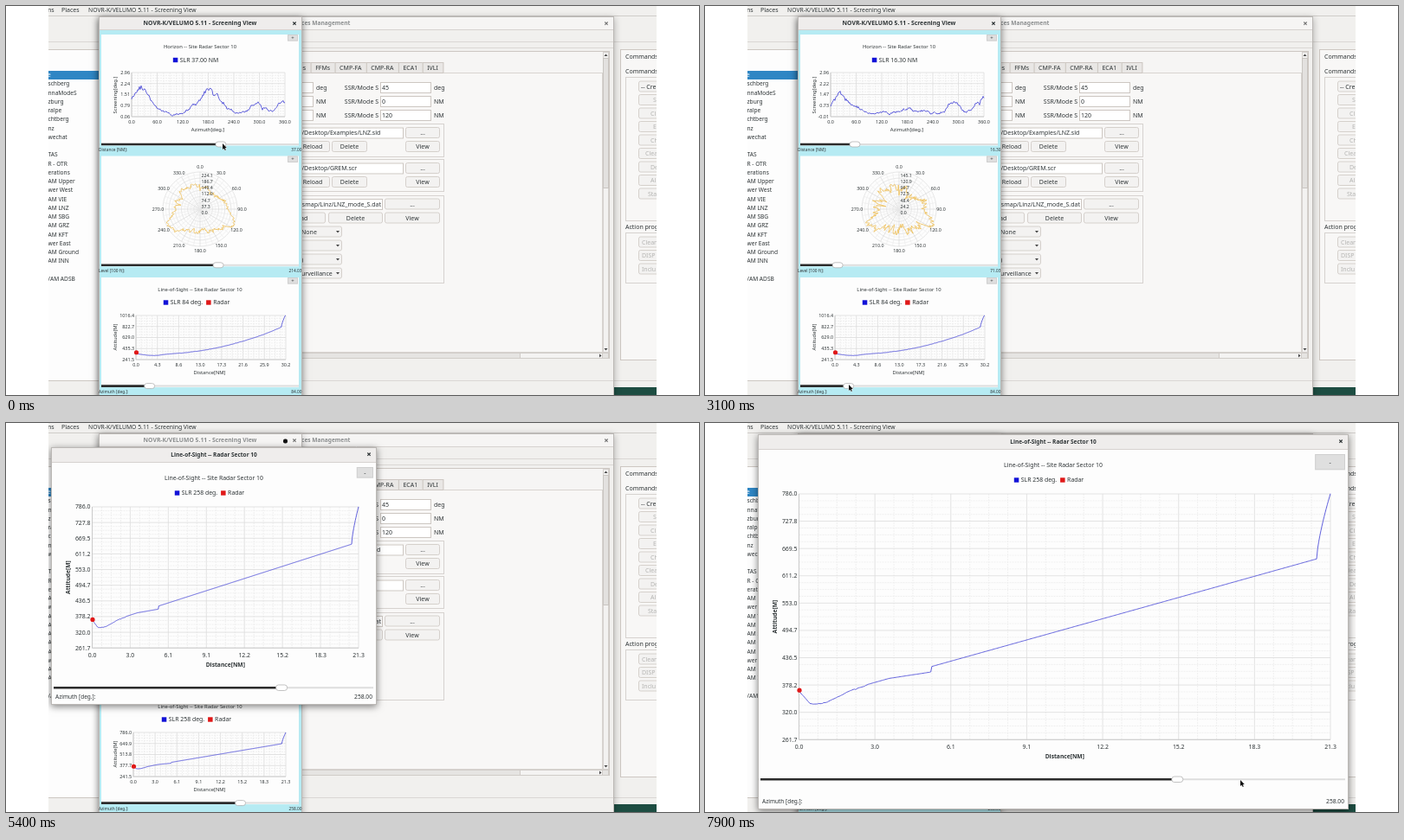
An HTML page with a canvas that plays this animation: 800x450 px, repeating every 8000 ms.

```html
<!DOCTYPE html>
<html lang="en">
<head>
<meta charset="utf-8">
<title>Screening View</title>
<style>
html, body { margin: 0; width: 100%; height: 100%; overflow: hidden; background: #fff; }
canvas { display: block; }
</style>
</head>
<body>
<canvas id="stage" width="800" height="450"></canvas>
<script>
const c = document.getElementById('stage').getContext('2d');
const LOOP = 8000, APP = 'NOVR-K/VELUMO 5.11 - Screening View';
const BLUE = '#1212d8', RED = '#e01818', CURVE = '#5050d8';
const INK = '#2e3436', FADED = '#8b8e8f', GREY = '#b4b4b2', EDGE = '#cdc7c2';
const FONT = '"Noto Sans", "Open Sans", sans-serif';

const lerp = (a, b, k) => a + (b - a) * k;
const ramp = (v, a, b) => Math.max(0, Math.min(1, (v - a) / (b - a)));
const bump = (v, mid, width) => Math.exp(-(((v - mid) / width) ** 2));
const range = (n, f) => Array.from({ length: n }, (_, i) => f(i));

// Seeded noise in -1..1, and a rugged mix of two octaves of it
const noise = i => { const v = Math.sin(i * 127.1 + 3.7) * 43758.5453; return (v - Math.floor(v)) * 2 - 1; };
const rough = p => {
  const q = p / 4, i = Math.floor(q);
  return .65 * lerp(noise(i), noise(i + 1), q - i) + .35 * noise(Math.floor(p));
};

// Skyline height in pixels above the axis, for the far and the near range
const far = u => 2 + 28 * bump(u, .06, .1) + 27 * bump(u, .51, .11) + 14 * bump(u, .81, .06) + 14 * bump(u, 1, .09);
const near = u => 4 + 20 * bump(u, .05, .05) + 10 * bump(u, .11, .08) + 4 * bump(u, .52, .09)
  + 13 * bump(u, .8, .05) + 16 * bump(u, 1, .08);
const coverage = deg => 25 + 15 * bump(deg, 112, 28) + 15 * bump(deg, 240, 26) + 4 * bump(deg, 325, 40);

// Terrain altitude along the two bearings, u = 0..1
const east = u => 330 + 520 * u ** 2.4 + 18 * ramp(u, .05, 0) - 22 * bump(u, .13, .07)
  + 6 * rough(u * 70) + 166 * ramp(u, .97, .995) ** .7;
const west = u => 338.5 + 317 * u + 28 * ramp(u, .021, 0) - 14 * bump(u, .05, .035)
  - (u < .25 ? 11 * ramp(u, .17, .246) : 0) + 131 * ramp(u, .974, 1) ** .7
  + (u > .02 && u < .13 ? 2.5 * rough(u * 200) : 0);

function box(x0, y0, x1, y1, fill, stroke) {
  if (fill) { c.fillStyle = fill; c.fillRect(x0, y0, x1 - x0, y1 - y0); }
  if (stroke) {
    c.strokeStyle = stroke; c.lineWidth = 1;
    c.strokeRect(x0 + .5, y0 + .5, x1 - x0 - 1, y1 - y0 - 1);
  }
}
function text(s, x, y, size = 7, align = 'left', color = INK, weight = 400) {
  c.font = `${weight} ${size}px ${FONT}`;
  c.textAlign = align; c.fillStyle = color;
  c.fillText(s, x, y + size * .36);
}
function measure(s, size = 7) {
  c.font = `400 ${size}px ${FONT}`;
  return c.measureText(s).width;
}
function line(points, color, width = 1, dash = []) {
  c.beginPath();
  points.forEach(p => c.lineTo(...p));
  c.strokeStyle = color; c.lineWidth = width; c.setLineDash(dash);
  c.stroke(); c.setLineDash([]);
}
const rule = (x0, x1, y, color = '#dad7d4') => line([[x0, y + .5], [x1, y + .5]], color);
function upright(s, x, y, size, weight) {
  c.save(); c.translate(x, y); c.rotate(-Math.PI / 2);
  text(s, 0, 0, size, 'center', INK, weight);
  c.restore();
}
function button(x0, x1, y, label = '', color = INK) {
  c.beginPath(); c.roundRect(x0 + .5, y - 6, x1 - x0 - 1, 12, 2);
  c.fillStyle = '#f3f2f1'; c.fill();
  c.strokeStyle = EDGE; c.lineWidth = .8; c.stroke();
  text(label, (x0 + x1) / 2, y, 7, 'center', color);
}
function field(x0, x1, y, label = '') {
  box(x0, y - 6, x1, y + 7, '#fff', EDGE);
  text(label, x0 + 2, y);
}
function triangle(x, y, angle = 0) {
  c.save(); c.translate(x, y); c.rotate(angle);
  c.fillStyle = '#444'; c.beginPath();
  c.moveTo(-2, -1); c.lineTo(2, -1); c.lineTo(0, 1.5); c.fill();
  c.restore();
}
// Window with shadow, title bar and close mark
function frame(x, y, w, h, fill, active, barHeight = 16) {
  c.save();
  c.shadowColor = active ? 'rgba(0,0,0,.5)' : 'rgba(0,0,0,.3)'; c.shadowBlur = 8; c.shadowOffsetY = 2;
  box(x, y, x + w, y + h, fill);
  c.restore();
  box(x, y, x + w, y + barHeight, active ? '#efedec' : '#f6f5f4');
  rule(x, x + w, y + barHeight - 1, '#d6d2cf');
  box(x, y, x + w, y + h, null, '#bbb8b5');
  const cx = x + w - 9, cy = y + 8.2, color = active ? INK : '#777';
  line([[cx - 1.7, cy - 1.7], [cx + 1.7, cy + 1.7]], color, 1.1);
  line([[cx + 1.7, cy - 1.7], [cx - 1.7, cy + 1.7]], color, 1.1);
}
function slider(x0, x1, x, y, knob = 6) {
  line([[x, y], [x1, y]], '#dedede', 2);
  line([[x0, y], [x, y]], '#2b2b2b', 2.6);
  c.beginPath(); c.roundRect(x - knob, y - knob * .5, knob * 2, knob, 3);
  c.fillStyle = '#fff'; c.fill();
  c.strokeStyle = '#aaa'; c.lineWidth = .7; c.stroke();
}
function legend(cx, y, items) {
  const widths = items.map(i => measure(i[1], 6.9) + 8);
  let x = cx - (widths.reduce((a, b) => a + b) + 4 * (items.length - 1)) / 2;
  items.forEach(([color, label], i) => {
    box(x, y - 2.7, x + 5.5, y + 2.7, color);
    text(label, x + 8, y, 6.9);
    x += widths[i] + 4;
  });
}
// Grid with tick labels and four subdivisions per tick
function axes(x0, y0, x1, y1, xs, ys, size) {
  const grid = (labels, draw) => range(labels.length * 4 - 3, i => {
    const major = i % 4 == 0;
    draw(i / (labels.length * 4 - 4), [major ? '#dcdcdc' : '#ececec', .8, major ? [] : [2, 1]], major && labels[i / 4]);
  });
  grid(xs, (k, style, label) => {
    const x = lerp(x0, x1, k);
    line([[x, y0], [x, y1]], ...style);
    if (label) text(label, x, y1 + size + 1, size, 'center');
  });
  grid(ys, (k, style, label) => {
    const y = lerp(y0, y1, k);
    line([[x0, y], [x1, y]], ...style);
    if (label) text(label, x0 - 2, y, size, 'right');
  });
  line([[x0, y0], [x0, y1], [x1, y1]], '#c4c4c4', .8);
}
const ticks = (a, b, n, digits) => range(n + 1, i => lerp(a, b, i / n).toFixed(digits));

function siteList() {
  rule(49, 107, 41);
  box(49, 50, 107, 433, '#fdfdfd');
  rule(49, 107, 50, EDGE); rule(49, 107, 433, EDGE);
  box(49, 75, 107, 85, '#2f86c4');
  text('e', 48, 80, 6.6, 'left', '#fff');
  ['schberg', 'nnaModeS', 'zburg', 'ralpe', 'chtberg', 'nz', 'wechat', '', 'TAS', 'R - OTR', 'erations',
   'AM Upper', 'wer West', 'AM VIE', 'AM LNZ', 'AM SBG', 'AM GRZ', 'AM KFT', 'wer East', 'AM Ground', 'AM INN',
   '', '/AM ADSB']
    .forEach((s, i) => text(s, 48.5, 90 + i * 10.25, 6.6));
}

function commands() {
  rule(702, 751, 41);
  box(709, 50, 752, 410, '#f8f7f6', EDGE);
  text('Commands', 715, 58); text('Commands', 715, 75); text('Action prog', 715, 255);
  box(715, 82, 760, 249, null, '#d6d2cf');
  box(715, 262, 760, 321, null, '#d6d2cf');
  button(730, 765, 93); text('-- Cre', 733, 93);
  const clipped = (s, x, y) => { button(730, 775, y); text(s, x, y, 7, 'left', GREY); };
  ['S', 'Cl', 'E', 'Ch', 'Clea', 'De', 'Al', 'Sta'].forEach((s, i) => clipped(s, 750 - 3 * s.length, 108.5 + i * 15.5));
  ['Clean', 'DISP', 'Inclu'].forEach((s, i) => clipped(s, 734, 273 + i * 15.5));
  rule(702, 751, 433);
  box(702, 441, 751, 450, '#1d4d42');
}

function management() {
  frame(107, 12, 595, 460, '#f1f0ee', false);
  text('ces Management', 341, 20, 6.6, 'left', FADED, 700);
  rule(107, 701, 41); rule(107, 701, 48);
  box(330, 52, 697, 408, '#f6f5f4', EDGE);
  box(330, 77, 689, 401, '#f8f7f6', '#d8d4d0');
  let tab = 330;
  ['ses', 'FFMs', 'CMP-FA', 'CMP-RA', 'ECA1', 'IVLI'].forEach(s => {
    const w = measure(s) + 11;
    box(tab, 65, tab + w + 1, 78, '#e9e7e5', EDGE);
    text(s, tab + w / 2, 71.5, 7, 'center');
    tab += w;
  });
  [['deg', '45'], ['NM', '0'], ['NM', '120']].forEach(([unit, value], i) => {
    const y = 94 + i * 16;
    field(320, 355, y); text(unit, 358, y);
    text('SSR/Mode S', 430, y, 7, 'right');
    field(432, 491, y, value); text(unit, 494, y);
  });
  [[136, 175], [177, 215], [219, 321]].forEach(([a, b]) => box(330, a, 506, b, null, '#d6d2cf'));
  ['/Desktop/Examples/LNZ.sld', '/Desktop/GREM.scr'].forEach((path, i) => {
    const y = 146.5 + i * 41;
    field(320, 459, y); text(path, 341.5, y);
    button(461, 501, y, '...');
    button(334, 374, y + 16, 'Reload'); button(376, 417, y + 16, 'Delete'); button(461, 501, y + 16, 'View');
  });
  field(320, 435, 229); text('nsmap/Linz/LNZ_mode_S.dat', 433, 229, 7, 'right');
  button(437, 501, 229, '...');
  button(310, 369, 245); text('ad', 340, 245);
  button(372, 435, 245, 'Delete'); button(437, 501, 245, 'View');
  ['None', '', ')', 'urveillance'].forEach((s, i) => {
    const y = 261 + i * 16;
    button(320, 388, y); text(s, 341, y); triangle(383, y);
  });

  // Scroll bars
  box(689, 53, 696, 401, '#f3f2f1', '#d5d1ce');
  box(689, 60, 696, 211, '#e3e1df', '#c9c5c1');
  triangle(692.5, 57, Math.PI); triangle(692.5, 397);
  box(330, 401, 696, 408, '#e6e4e2', '#d0ccc8');
  box(593, 401, 689, 408, '#f4f3f2', '#d0ccc8');
  triangle(686, 404.5, -Math.PI / 2);
  rule(330, 701, 433);
}

function desktop() {
  box(49, 0, 751, 450, '#f1f0ee');
  text('ns', 48, 4.5); text('Places', 64, 4.5); text(APP, 95, 4.5, 6.8);
  rule(49, 751, 11, '#cfccc9');
  siteList();
  commands();
  management();
}

function horizon(distance) {
  const k = (37 - distance) / 20.7;
  text('Horizon -- Site Radar Sector 10', 224, 46.5, 5.9, 'center');
  legend(219, 62.5, [[BLUE, `SLR ${distance.toFixed(2)} NM`]]);
  axes(145, 77, 322, 128, ticks(0, 360, 6, 1), ticks(2.961, lerp(.06, -.014, k), 4, 2), 5.4);
  text('Azimuth[deg.]', 233, 143, 5.8, 'center');
  upright('Screening[deg.]', 126, 103, 5.8);
  line(range(178, i => {
    const h = lerp(far(i / 177), near(i / 177), k);
    return [145 + i, 128 - Math.max(.5, h + rough(i + Math.round(distance)) * (2 + h * .15))];
  }), CURVE, .9);
}

function polar(level) {
  const cx = 224, cy = 235, R = 43, low = ramp(level, 214, 71);
  const ray = (deg, r) => [cx + r * Math.sin(deg * Math.PI / 180), cy - r * Math.cos(deg * Math.PI / 180)];
  for (let i = 1; i <= 12; i++) line(range(73, j => ray(j * 5, R * i / 12)), i % 2 ? '#eeeeee' : '#dddddd', .7);
  for (let d = 0; d < 360; d += 10) line([[cx, cy], ray(d, R)], d % 30 ? '#ececec' : '#dadada', .7);
  for (let d = 0; d < 360; d += 30) {
    const [x, y] = ray(d, 48.5);
    text(d.toFixed(1), x, y, 5.3, 'center');
  }
  line(range(241, i => {
    const deg = i % 240 * 1.5;
    return ray(deg, coverage(deg) * (1 - .08 * low) + rough(i % 240) * (5 + 5 * low));
  }), '#f0c565', .9);
  const top = 224.06 - 79 * low ** 1.16;
  for (let i = 0; i <= 6; i++) text((top * i / 6).toFixed(1), 225.5, 239 - i * 7.15, 5.2);
}

function radarDot(x, y) {
  c.beginPath(); c.arc(x, y, 2.6, 0, 7); c.fillStyle = RED; c.fill();
}
function profile(azimuth) {
  const k = (azimuth - 84) / 174, low = 241.54, high = lerp(1016.4, 786.02, k), x0 = lerp(150, 147, k);
  text('Line-of-Sight -- Site Radar Sector 10', 224, 327.5, 5.9, 'center');
  legend(220, 343, [[BLUE, `SLR ${Math.round(azimuth)} deg.`], [RED, 'Radar']]);
  axes(x0, 358, 323, 409, ticks(0, lerp(30.24, 21.3, k), 7, 1), ticks(high, low, 4, 1), 5.4);
  text('Distance[NM]', 235, 424, 5.8, 'center');
  upright('Attitude[M]', 126, 383, 5.8);
  const y = v => lerp(409, 358, (v - low) / (high - low));
  line(range(301, i => {
    const u = i / 300, hills = 100 * Math.sin(k * Math.PI) * u * (1 - u) * rough(i / 3 + Math.round(azimuth));
    return [lerp(x0, 323, u), y(lerp(east(u), west(u), k) + hills)];
  }), CURVE, .9);
  radarDot(x0 + .5, y(367));
}

function screening(distance, level, azimuth, active) {
  frame(107, 12, 235, 460, '#b6ebf3', active);
  text(APP, 224, 20, 6.8, 'center', active ? INK : FADED, 700);
  [['Distance [NM]:', distance, 114 + distance * 3.62],
   ['Level [100 ft]:', level, 107.4 + level * .643],
   ['Azimuth [deg.]:', azimuth, 115 + azimuth * .603]].forEach(([label, value, x], i) => {
    const top = 33 + i * 140.5, y = 160 + i * 139.8;
    box(110, top, 338, y + 1.5, '#fdfdfd');
    box(325, top, 337, top + 7.5, '#dfdfdf', '#cfcfcf');
    text('+', 331, top + 3.5, 6, 'center');
    slider(110, 338, x, y);
    text(label, 107, y + 6.7, 4.8); text(value.toFixed(2), 341.5, y + 6.7, 4.8, 'right');
  });
  horizon(distance); polar(level); profile(azimuth);
}

function popup(x, y, w, h, layoutW, layoutH) {
  const extra = (h - 300) * .11;
  frame(x, y, w, h, '#fdfdfd', true, 18);
  text('Line-of-Sight -- Radar Sector 10', x + w / 2, y + 8.5, 6.5, 'center', INK, 700);
  const bw = w * .051, bh = h * .042, right = x + w - 4;
  box(right - bw, y + 23, right, y + 23 + bh, '#dfdfdf', '#d0d0d0');
  text('-', right - bw / 2, y + 23 + bh / 2, 7, 'center');

  // The chart keeps its last layout and is stretched while the window grows
  c.save();
  c.translate(x, y); c.scale(w / layoutW, h / layoutH);
  const x0 = 47.5, y0 = 69, x1 = layoutW - 21, y1 = layoutH - 66 - extra, mid = layoutW / 2;
  text('Line-of-Sight -- Site Radar Sector 10', mid, 36, 6.9, 'center');
  legend(mid - 5, 53, [[BLUE, 'SLR 258 deg.'], [RED, 'Radar']]);
  axes(x0, y0, x1, y1, ticks(0, 21.3, 7, 1), ticks(786.02, 261.7, 9, 1), 6.9);
  text('Distance[NM]', (x0 + x1) / 2, y1 + 19, 6.7, 'center', INK, 600);
  upright('Attitude[M]', 20, (y0 + y1) / 2, 6.7, 600);
  const py = v => lerp(y1, y0, (v - 261.7) / 524.3);
  line(range(501, i => [lerp(x0, x1, i / 500), py(west(i / 500))]), CURVE, .9);
  radarDot(x0 + .5, py(367));
  c.restore();

  slider(x + 3, right, x + 3 + (w - 7) * .713, y + h - 20 - extra, 6.5);
  text('Azimuth [deg.]:', x + 5, y + h - 9.5, 6.5);
  text('258.00', x + w - 5, y + h - 9.5, 6.7, 'right');
}

function pointer([x, y], kind) {
  c.save(); c.translate(x, y);
  if (kind == 'grab') {
    c.beginPath(); c.roundRect(-1, -2.5, 5, 5, 2);
    c.fillStyle = '#111'; c.fill();
  } else if (kind == 'resize') {
    line([[-3, -3], [2, 2]], '#111', 1.5);
    line([[3, -3], [3, 3], [-4, 3]], '#111', 1.5);
    line([[2, -2], [2, 2], [-2, 2]], '#111', 1);
  } else {
    c.beginPath();
    [[0, -3], [0, 4], [1.6, 2.7], [2.8, 5], [3.8, 4.5], [2.8, 2.2], [4.8, 2]].forEach(p => c.lineTo(...p));
    c.closePath();
    c.strokeStyle = '#fff'; c.lineWidth = 1; c.stroke();
    c.fillStyle = '#111'; c.fill();
  }
  c.restore();
}

// Mouse stops: time, x, y
const MOUSE = [[0, 250, 162], [900, 175, 161], [1300, 246, 298], [2700, 152, 299], [3100, 166, 441],
  [3800, 271, 441], [4200, 330, 322], [4500, 330, 322], [4900, 481, 83], [5400, 321, 21],
  [6200, 439, 314], [6600, 545, 376], [7100, 717, 441], [7400, 745, 446], [7800, 618, 416]];
function mouse(t) {
  const i = MOUSE.findLastIndex(m => m[0] <= t), a = MOUSE[i], b = MOUSE[i + 1] || a;
  const k = ramp(t, a[0], b[0] + 1e-6);
  return [lerp(a[1], b[1], k), lerp(a[2], b[2], k)];
}

function draw(t) {
  c.clearRect(0, 0, 800, 450);
  c.save();
  c.beginPath(); c.rect(49, 0, 702, 450); c.clip();
  desktop();
  const open = t >= 4500;
  screening(lerp(37, 16.3, ramp(t, 0, 1000)), lerp(214.03, 71.03, ramp(t, 1500, 2862)),
    lerp(84, 258, ramp(t, 3100, 3800)), !open);
  if (open) {
    const drag = ramp(t, 4900, 5400), settle = ramp(t, 5400, 5600), grow = ramp(t, 6600, 7205);
    const width = k => 376 + 2 * settle + 304 * k, height = k => 298 + 3 * settle + 133 * k;
    popup(lerp(212, 52, drag) + 9 * settle, lerp(76, 28, drag) - 15 * settle,
      width(grow), height(grow), width(grow ** 3), height(grow ** 3));
  }
  pointer(mouse(t), t >= 4900 && t < 5700 ? 'grab' : t >= 6200 && t < 7500 ? 'resize' : 'arrow');
  c.restore();
}
function tick(now) {
  draw(Math.floor(now % LOOP / 100) * 100);
  requestAnimationFrame(tick);
}
requestAnimationFrame(tick);
</script>
</body>
</html>
```
